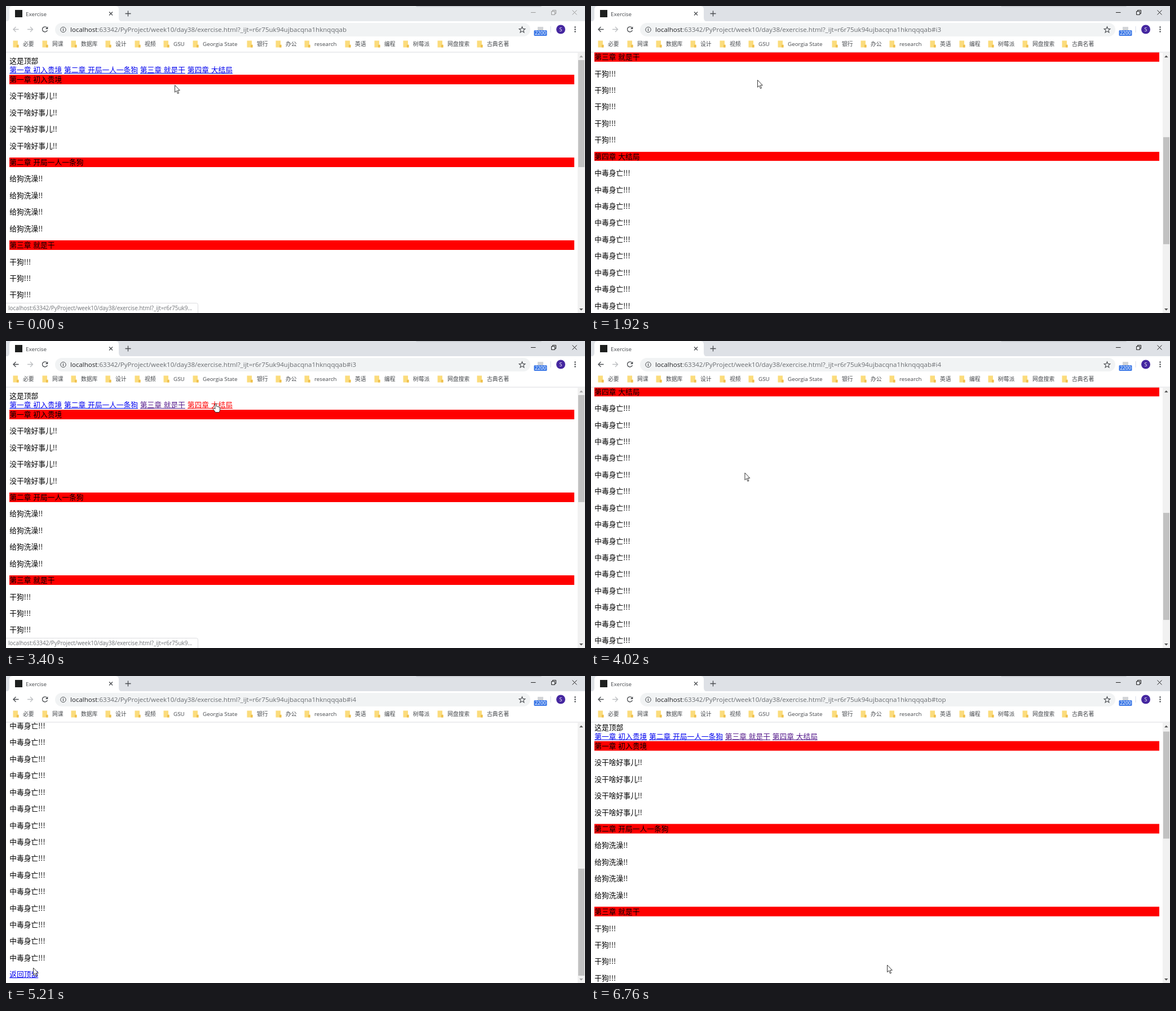
Animation, 1027 px wide and 545 px high, one loop 6.84 s. Source, as an HTML page:

```html
<!DOCTYPE html>
<html lang="zh-CN">
<head>
<meta charset="utf-8">
<title>Exercise</title>
<style>
html, body { margin: 0; width: 100%; height: 100%; overflow: hidden; background: #fff; }
#view { position: absolute; left: 0; top: 82.2px; width: 1014px; height: 463px; overflow: hidden; }
#page { padding: .5em; font: 12.73px/1.3125 "Noto Sans CJK SC", "Noto Sans CJK JP", sans-serif; color: #000; word-spacing: .95px; }
#page p { margin: 1em 0; }
.bar { background: #f00; }
u { color: #00e; text-decoration-thickness: 1px; text-underline-offset: 1px; text-decoration-skip-ink: none; }
svg { position: absolute; left: 0; top: 0; font-family: "Open Sans", "Noto Sans CJK SC", "Noto Sans CJK JP", sans-serif; }
.line { fill: none; stroke: #4a4d51; stroke-width: 1.3; }
</style>
</head>
<body>
<div id="view"><div id="page"></div></div>
<svg width="1027" height="545" viewBox="0 0 1027 545">
  <rect id="strip" width="1027" height="28"/>
  <rect x="727" y="-3" width="223" height="4.5" rx="2" fill="#c6c9ce"/>
  <path d="M0 28Q6 27 6 21V6Q6 0 12 0H194Q200 0 200 6V21Q200 27 206 28Z" fill="#fff"/>
  <rect x="16" y="7" width="13" height="13" fill="#1d1f1e"/>
  <text x="35" y="17.5" font-size="9.8" fill="#45484c">Exercise</text>
  <path class="line" d="M183 10.5l6 6m0-6l-6 6M211.500 13.500h10m-5-5v10"/>
  <path id="buttons" class="line" style="stroke-width:1" d="M931 11.500h8.500M967.500 9.500h6v6h-6zM969.500 9.500v-2h6v6h-2M1004.500 7.500l8 8m0-8l-8 8"/>

  <rect y="27" width="1027" height="55" fill="#fff"/>
  <rect y="81.500" width="1027" height="1" fill="#dadce0"/>
  <path id="back" class="line" d="M22.500 41.500h-9.500m4.500-4.500l-4.500 4.500 4.500 4.500"/>
  <path class="line" style="stroke:#bcbec1" d="M38 41.500h9.500m-4.500-4.500l4.500 4.500-4.500 4.500"/>
  <path class="line" d="M72.500 38.300A4.600 4.600 0 1 0 73.400 43"/>
  <path d="M74.300 36.500v4.500h-4.500z" fill="#4a4d51"/>
  <rect x="87" y="30" width="843" height="24" rx="12" fill="#f1f3f4"/>
  <circle class="line" style="stroke-width:1" cx="101.500" cy="42" r="4.700"/>
  <path class="line" d="M101.500 41.300v3.200m0-5v1.200"/>
  <text x="114" y="46" font-size="11.55" fill="#6a6d71"><tspan fill="#202124">localhost</tspan><tspan id="url"></tspan></text>
  <path class="line" style="stroke-width:1.100" d="M915.500 36.800l1.500 3.600 3.900.3-3 2.500 1 3.800-3.400-2.100-3.400 2.100 1-3.800-3-2.500 3.900-.3z"/>
  <rect x="943" y="37" width="10" height="7" fill="#d2d4d7"/>
  <rect x="936.500" y="43" width="23" height="10" rx="1.500" fill="#3b78e7"/>
  <text x="948" y="51.200" font-size="8.6" fill="#fff" text-anchor="middle">2200</text>
  <rect x="965.500" y="36" width="1" height="11" fill="#d5dcec"/>
  <circle cx="984" cy="41.500" r="8" fill="#4527a0"/>
  <text x="984" y="44.800" font-size="9" fill="#fff" text-anchor="middle">S</text>
  <g fill="#4a4d51"><circle cx="1009.500" cy="37.500" r="1.300"/><circle cx="1009.500" cy="41.500" r="1.300"/><circle cx="1009.500" cy="45.500" r="1.300"/></g>
  <g id="bookmarks" font-size="9.8" fill="#45484c"></g>

  <rect x="1014" y="82.500" width="13" height="463" fill="#f1f1f1"/>
  <rect id="thumb" x="1015" width="11" height="190" fill="#c1c1c1"/>
  <path id="up" d="M1017 91.200h6.600l-3.300-3.500z"/>
  <path id="down" d="M1017 537h6.600l-3.300 3.500z"/>

  <g id="status">
    <path d="M-1 527.500H337.500Q340.500 527.500 340.500 530.500V546H-1Z" fill="#fff" stroke="#dcdddf"/>
    <text x="4" y="540.300" font-size="9.9" fill="#6f7276">localhost:63342/PyProject/week10/day38/exercise.html?_ijt=r6r75uk9...</text>
  </g>
  <g id="cursor" fill="#fff" stroke="#222" stroke-width=".9" stroke-linejoin="round">
    <path id="arrow" d="M.5 .5V13.200L3.400 10.500 5.500 15.500 7.500 14.700 5.400 9.800H9.300Z"/>
    <path id="hand" d="M-1.200 9V1.200Q-1.200 0 0 0T1.200 1.200V5Q3.300 4.200 3.700 5.800 5.500 5.200 5.800 6.600 7.500 6.300 7.500 8V11Q7.500 13 6 15.500H-.5Q-2 13-4.500 10.300-5.300 8.800-3.600 8.200-2.500 8-1.200 9.800Z"/>
  </g>
</svg>
<script>
const $ = id => document.getElementById(id);
const LOOP = 6840, MAX_SCROLL = 600.7;
const URL_PATH = ':63342/PyProject/week10/day38/exercise.html?_ijt=r6r75uk94ujbacqna1hknqqqab';

const chapters = [
  ['第一章 初入贵境', '没干啥好事儿!!', 4],
  ['第二章 开局一人一条狗', '给狗洗澡!!', 4],
  ['第三章 就是干', '干狗!!!', 5],
  ['第四章 大结局', '中毒身亡!!!', 17]
];
$('page').innerHTML = '<div>这是顶部</div><div>' +
  chapters.map(([title], i) => `<u id="link${i + 1}">${title}</u>`).join(' ') + '</div>' +
  chapters.map(([title, line, n]) => `<div class="bar">${title}</div>` + `<p>${line}</p>`.repeat(n)).join('') +
  '<div><u id="toTop">返回顶部</u></div>';

const bookmarks = { 必要: 12, 网课: 64, 数据库: 115, 设计: 176, 视频: 228, GSU: 279, 'Georgia State': 331,
  银行: 427, 办公: 478, research: 529, 英语: 601, 编程: 653, 树莓派: 704, 网盘搜索: 765, 古典名著: 835 };
$('bookmarks').innerHTML = Object.entries(bookmarks).map(([name, x]) =>
  `<path d="M${x + .5} 61.500h8.500v7h1.500v5h-10z" fill="#fbdc7c"/><path d="M${x + 7} 73.500v-4.500h3.500v4.500z" fill="#eebf4d"/>
   <text x="${x + 18}" y="71.300">${name}</text>`).join('');

// Keys are [time, ...values]; a repeated time makes a hard change.
const scrollKeys = [[0, 0], [1390, 0], [1390, 334.1], [2125, 334.1], [2400, 0], [3490, 0], [3490, 510.7],
  [4110, 510.7], [4350, MAX_SCROLL], [5980, MAX_SCROLL], [5980, 6.4]];
const statusKeys = [[0, 1], [140, 1], [300, 0], [830, 0], [1070, 1], [1690, 1], [1920, 0],
  [2780, 0], [2960, 1], [3780, 1], [3950, 0]];
const cursorKeys = [[0, 299, 140], [100, 299, 140], [680, 292, 115], [780, 292, 115], [920, 291, 104], [1070, 291, 113],
  [1640, 291, 113], [1920, 295, 131], [2650, 295, 131], [3080, 372, 111], [3730, 372, 111], [4020, 272.5, 233.500],
  [4350, 256, 248], [4489, 256, 248], [4490, 255, 248.500], [4600, 255, 248.500], [5210, 48, 517.500], [5280, 46, 520],
  [5670, 38, 528], [6180, 38, 528], [6760, 525, 512.500]];

function at(keys, t) {
  const i = keys.findIndex(k => k[0] > t);
  if (i < 0) return keys.at(-1).slice(1);
  const a = keys[i - 1], b = keys[i], f = (t - a[0]) / (b[0] - a[0]);
  return a.slice(1).map((v, j) => v + (b[j + 1] - v) * f);
}
const within = (t, from, to) => t >= from && t < to;
const show = (id, on) => $(id).style.display = on ? '' : 'none';
const linkColor = (id, active, visited) => $(id).style.color = active ? '#f00' : visited ? '#551a8b' : '#00e';

function draw(t) {
  const [scroll] = at(scrollKeys, t), [x, y] = at(cursorKeys, t);
  const focused = t >= 1300, visited = t >= 1390;

  $('strip').style.fill = focused ? '#dee1e6' : '#e7eaed';
  $('buttons').style.stroke = focused ? '#222' : '#999';
  $('back').style.stroke = visited ? '#4a4d51' : '#bcbec1';
  $('url').textContent = URL_PATH + (t >= 5980 ? '#top' : t >= 3490 ? '#i4' : visited ? '#i3' : '');

  $('page').style.transform = `translateY(${-scroll}px)`;
  $('thumb').setAttribute('y', 96 + scroll * 246 / MAX_SCROLL);
  $('up').style.fill = scroll > 0 ? '#505050' : '#a3a3a3';
  $('down').style.fill = scroll < MAX_SCROLL ? '#505050' : '#a3a3a3';
  linkColor('link3', false, visited);
  linkColor('link4', within(t, 3310, 3490), t >= 3490);
  linkColor('toTop', within(t, 5820, 5980), false);

  const hand = within(t, 540, 1690) || within(t, 2820, 3780) || within(t, 5440, 6230);
  show('hand', hand);
  show('arrow', !hand);
  $('cursor').setAttribute('transform', `translate(${x} ${y})`);
  $('status').style.opacity = at(statusKeys, t)[0];
}

const start = performance.now();
function tick() {
  draw((performance.now() - start) % LOOP);
  requestAnimationFrame(tick);
}
tick();
</script>
</body>
</html>
```
